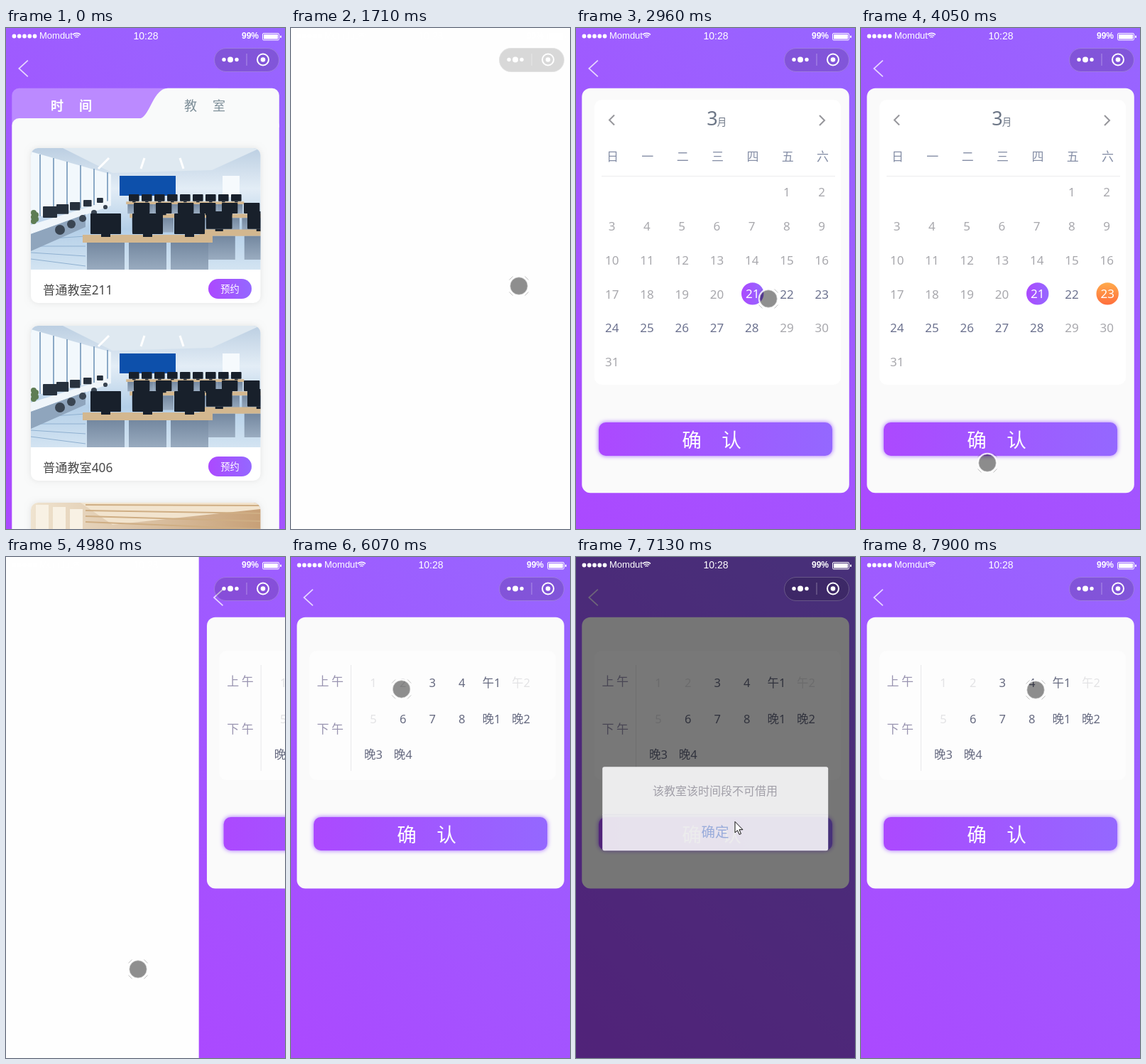
An HTML page with a canvas that plays this animation: 393x705 px, repeating every 8000 ms.

```html
<!DOCTYPE html>
<html lang="zh">
<head>
<meta charset="utf-8">
<title>教室预约</title>
<style>
html, body { margin: 0; width: 100%; height: 100%; overflow: hidden; background: #fff; }
canvas { display: block; width: 393px; height: 705px; }
</style>
</head>
<body>
<canvas id="stage"></canvas>
<script>
const W = 393, H = 705, LOOP = 8000;
const SANS = '"Noto Sans", "Noto Sans CJK SC", "Noto Sans CJK", sans-serif';
const UI = '"Liberation Sans", sans-serif';

const canvas = document.getElementById('stage');
const dpr = window.devicePixelRatio || 1;
canvas.width = W * dpr;
canvas.height = H * dpr;
const g = canvas.getContext('2d');

const clamp = v => Math.max(0, Math.min(1, v));
const smooth = v => v * v * (3 - 2 * v);
const lerp = (a, b, p) => a + (b - a) * p;
const repeat = (n, draw) => { for (let i = 0; i < n; i++) draw(i); };

// ---------- drawing helpers ----------
function box(x, y, w, h, fill, r = 0) {
  g.fillStyle = fill;
  g.beginPath();
  g.roundRect(x, y, w, h, r);
  g.fill();
}

function outline(x, y, w, h, r, color) {
  g.strokeStyle = color;
  g.lineWidth = 1;
  g.beginPath();
  g.roundRect(x, y, w, h, r);
  g.stroke();
}

function disc(x, y, r, fill) {
  g.fillStyle = fill;
  g.beginPath();
  g.arc(x, y, r, 0, 7);
  g.fill();
}

function ring(x, y, r, width, color, from = 0, to = 7) {
  g.strokeStyle = color;
  g.lineWidth = width;
  g.beginPath();
  g.arc(x, y, r, from, to);
  g.stroke();
}

function trace(pts) {
  g.beginPath();
  for (let i = 0; i < pts.length; i += 2) g.lineTo(pts[i], pts[i + 1]);
}

function poly(fill, ...pts) {
  g.fillStyle = fill;
  trace(pts);
  g.closePath();
  g.fill();
}

function line(color, width, ...pts) {
  g.strokeStyle = color;
  g.lineWidth = width;
  trace(pts);
  g.stroke();
}

function chevron(x, y, w, h, width, color) {
  line(color, width, x + w, y - h, x, y, x + w, y + h);
}

function text(s, x, y, size, fill, { font = SANS, align = 'center', weight = 400 } = {}) {
  g.font = `${weight} ${size}px ${font}`;
  g.textAlign = align;
  g.fillStyle = fill;
  g.fillText(s, x, y + size * 0.37);
}

// Characters set one by one around evenly spaced centres.
function spread(s, x, gap, y, size, fill, weight) {
  [...s].forEach((c, i) => text(c, x + gap * i, y, size, fill, { weight }));
}

function grad(x0, y0, x1, y1, ...colors) {
  const f = g.createLinearGradient(x0, y0, x1, y1);
  colors.forEach((c, i) => f.addColorStop(i / (colors.length - 1), c));
  return f;
}

const violet = (x, w) => grad(x, 0, x + w, 0, '#ac49ff', '#9468ff');

function glowBox(x, y, w, h, fill, r, glow, blur) {
  g.save();
  g.shadowColor = glow;
  g.shadowBlur = blur * dpr;
  box(x, y, w, h, fill, r);
  g.restore();
}

// ---------- shared parts ----------
function backdrop() {
  g.fillStyle = grad(-78, 627, 471, 78, '#ab49ff', '#9766ff');
  g.fillRect(-3, 0, W + 3, H);
  chevron(18.3, 57, 12.5, 11.3, 1.7, 'rgba(255,255,255,.75)');
}

function sheet(h) {
  backdrop();
  box(8.3, 84.8, 376.5, h, '#fafafa', 12);
}

function confirmButton(y) {
  glowBox(32, y, 329, 47, violet(32, 329), 10, 'rgba(150,80,255,.9)', 6);
  spread('确认', 163, 56, y + 25, 27.5, '#fff', 500);
}

function statusBar() {
  repeat(5, i => disc(11.5 + 7.25 * i, 11.5, 2.9, '#fff'));
  text('Momdut', 47, 10.5, 13, '#fff', { font: UI, align: 'left' });
  repeat(3, i => ring(99.5, 15.5, 3 + 2.6 * i, 1.4, '#fff', -2.3, -0.84));
  text('10:28', 197, 11, 14, '#fff', { font: UI });
  text('99%', 332, 10.7, 12, '#fff', { font: UI, align: 'left', weight: 700 });
  outline(361.5, 7.5, 23, 9.5, 1.5, '#fff');
  box(363, 9, 20, 6.5, '#fff');
  box(386, 10.5, 2, 3.5, '#fff', 1);
}

function capsule() {
  box(293, 28, 92, 34, 'rgba(0,0,0,.15)', 17);
  outline(293.5, 28.5, 91, 33, 16.5, 'rgba(255,255,255,.22)');
  repeat(3, i => disc(307 + 9 * i, 44.5, i === 1 ? 4 : 2.7, '#fff'));
  line('rgba(255,255,255,.3)', 1.2, 339, 36, 339, 53);
  ring(362, 44.5, 8, 2, '#fff');
  disc(362, 44.5, 3.3, '#fff');
}

// ---------- classroom list ----------
// A row of n desks with screens, at scale s.
function deskRow(n, x, y, step, s) {
  const w = (n - 1) * step + 53 * s;
  box(x - 11 * s, y + 30 * s, w + 12 * s, 11 * s, '#d3b78f');
  repeat(n, i => {
    const left = x + i * step;
    box(left - 5 * s, y + 41 * s, 53 * s, 39 * s, grad(0, y + 41 * s, 0, y + 80 * s, '#7488a0', '#9aacc0'));
    box(left, y, 43 * s, 29 * s, '#18202b', 1);
    box(left + 15 * s, y + 29 * s, 13 * s, 4 * s, '#18202b');
  });
}

function labPhoto() {
  box(35, 169, 324, 171, grad(0, 169, 0, 340, '#bccfe2', '#e3edf6', '#b4cfe8', '#d3e4f2'));
  poly('#dfe9f1', 80, 169, 358, 169, 290, 200, 150, 204);
  repeat(3, i => line('#fff', 3, 130 + 60 * i, 198, 145 + 50 * i, 183));
  poly('#f2f8fc', 35, 174, 148, 206, 148, 244, 35, 268);
  repeat(6, i => line('#8ba9c6', 2, 48 + 19 * i, 178 + 5 * i, 48 + 19 * i, 265 - 4 * i));
  box(160, 208, 79, 28, '#0d50ab');
  box(305, 208, 24, 30, '#f6fafd');
  repeat(5, i => line('#8fb0d0', 1, 35, 325 - 9 * i, 112, 335 - 14 * i));
  poly('#eff5fa', 35, 277, 148, 242, 148, 250, 35, 290);
  poly('#8fa5bd', 35, 290, 112, 262, 112, 280, 35, 314);
  repeat(5, i => {
    const s = 1 - 0.14 * i;
    box(52 + 19 * i, 251 - 3 * i, 20 * s, 16 * s, '#27313d', 1);
    disc(76 + 16 * i, 284 - 8 * i, 7 * s, '#3a4552');
    disc(39 + 3 * (i % 2), 260 + 3 * i, 4, '#5e7d54');
  });
  deskRow(9, 173, 234, 18, 0.34);
  deskRow(6, 180, 246, 31, 0.52);
  deskRow(2, 282, 258, 58, 0.85);
  deskRow(3, 119, 261, 59, 1);
}

function hallPhoto() {
  box(35, 169, 324, 171, grad(35, 0, 358, 0, '#efe3cf', '#c7a077'));
  poly('#f2e4ce', 105, 169, 358, 169, 358, 178, 150, 200);
  repeat(4, i => line('#cfae84', 2, 112, 172 + 8 * i, 358, 173 + 11 * i));
  repeat(3, i => box(42 + 24 * i, 172 + 3 * i, 18, 40, '#f8f1e4'));
}

function card(y, name, photo) {
  g.save();
  g.translate(0, y - 169);
  glowBox(35, 169, 323.5, 218, '#fff', 10, 'rgba(0,0,0,.09)', 8);
  g.save();
  g.beginPath();
  g.roundRect(35, 169, 323.5, 171, [10, 10, 0, 0]);
  g.clip();
  photo();
  g.restore();
  text(name, 52, 369, 17.2, '#484848', { align: 'left' });
  box(285, 353, 61, 28, violet(285, 61), 14);
  text('预约', 315.5, 367, 13.2, '#fff');
  g.restore();
}

function listPage() {
  backdrop();
  box(8.3, 84.8, 300, 60, '#bb8aff', 10);
  box(8.3, 127, 376.5, H, '#f9fafa', 10);
  g.fillStyle = '#f9fafa';
  g.beginPath();
  g.moveTo(190, 127);
  g.bezierCurveTo(203, 122, 208, 84.8, 228, 84.8);
  g.arcTo(384.8, 84.8, 384.8, 100, 10);
  g.lineTo(384.8, 140);
  g.lineTo(190, 140);
  g.fill();
  spread('时间', 72, 40, 109.5, 18, '#fff', 700);
  spread('教室', 260, 40, 109.5, 18, '#7d8e98', 500);
  card(169, '普通教室211', labPhoto);
  card(419, '普通教室406', labPhoto);
  card(668, '普通教室512', hallPhoto);
}

// ---------- calendar ----------
function dayColor(d) {
  return d > 21 && d < 29 ? '#6d7390' : '#a8a8ad';
}

function calendarPage(picked) {
  sheet(569.5);
  box(26, 101, 347, 401, '#fff', 10);
  chevron(47, 129.5, 7, 7, 2, '#96969b');
  chevron(350, 130, -7, 7, 2, '#96969b');
  text('3', 192, 127.5, 27, '#6c7686');
  text('月', 205.5, 132, 13.5, '#6c7686');
  spread('日一二三四五六', 51.5, 49.35, 181, 17, '#858ea6', 300);
  line('#ececee', 1, 36, 208.5, 365, 208.5);
  repeat(31, i => {
    const d = i + 1, cell = i + 5;
    const x = 50.7 + 49.25 * (cell % 7), y = 231 + 47.8 * Math.floor(cell / 7);
    const fill = d === 21 ? violet(x - 15, 32)
      : d === 23 && picked ? grad(0, 358, 0, 390, '#ffab4c', '#ff6d3c') : null;
    if (fill) disc(x + 1, y - 0.5, 15.7, fill);
    text(d, fill ? x + 1 : x, fill ? y - 1 : y, 17, fill ? '#fff' : dayColor(d));
  });
  confirmButton(555);
}

// ---------- period picker ----------
const PERIODS = '1 2 3 4 午1 午2 5 6 7 8 晚1 晚2 晚3 晚4'.split(' ');
const TAKEN = ['1', '2', '5', '午2'];

function periodPage() {
  sheet(381.7);
  box(26, 132, 347, 182, '#fdfdfd', 10);
  spread('上午', 45, 20.5, 175, 17, '#9a95b1', 300);
  spread('下午', 45, 20.5, 242, 17, '#9a95b1', 300);
  line('#e8e8ea', 1, 84.5, 152, 84.5, 301);
  PERIODS.forEach((s, i) =>
    text(s, 116 + 41.6 * (i % 6), 177 + 50.4 * Math.floor(i / 6), 16.5, TAKEN.includes(s) ? '#e3e3e5' : '#666a80'));
  confirmButton(366);
}

function modal(alpha) {
  g.save();
  g.globalAlpha = alpha;
  g.fillStyle = 'rgba(0,0,0,.6)';
  g.fillRect(0, 0, W, H);
  box(37.2, 295.3, 318, 118, '#fdfdfe', 3);
  text('该教室该时间段不可借用', 196, 329.5, 16, '#96939e');
  line('#e4e4e8', 1, 37, 362.5, 355, 362.5);
  text('确定', 196, 387, 19.5, '#8ea3d8');
  g.restore();
}

// ---------- pointer ----------
// Each move: start time, end time, destination.
const ENTRY = [206, 535];
const MOVES = [
  [470, 624, 234, 278],
  [779, 1319, 321, 363],
  [2246, 2940, 271, 381],
  [2940, 3558, 346, 383],
  [3635, 4021, 178, 612],
  [4021, 4253, 186, 580],
  [5179, 6106, 155, 178],
  [6183, 6724, 224, 395],
  [7030, 7418, 219, 181],
  [7572, 7881, 246, 187]
];

function pointerAt(t) {
  let [x, y] = ENTRY;
  for (const [from, to, tx, ty] of MOVES) {
    const p = smooth(clamp((t - from) / (to - from)));
    x = lerp(x, tx, p);
    y = lerp(y, ty, p);
  }
  return [x, y];
}

function touchDot() {
  ring(0, 0, 13.2, 2, 'rgba(255,255,255,.85)');
  disc(0, 0, 12.2, 'rgba(0,0,0,.44)');
  ring(0, 0, 12.2, 1, 'rgba(205,205,205,.7)');
  repeat(4, () => {
    g.rotate(Math.PI / 2);
    line('rgba(110,110,110,.6)', 0.7, 8.5, 13.5, 13.5, 8.5);
  });
}

function arrow() {
  poly('#fff', 0.5, 0.5, 0.5, 16, 4, 12.8, 6.6, 18.6, 9, 17.5, 6.5, 11.8, 11.5, 11.8);
  g.strokeStyle = '#111';
  g.lineWidth = 1;
  g.stroke();
}

function pointer(t) {
  if (t < MOVES[0][0]) return;
  g.save();
  g.translate(...pointerAt(t));
  if (t > 6300 && t < 7200) arrow();
  else touchDot();
  g.restore();
}

// ---------- timeline ----------
const STEP = 77.2, START = 470;
const tick = t => t < START ? t : START + Math.floor((t - START) / STEP) * STEP;

function slideIn(t, from, page) {
  const p = clamp((t - from) / 245);
  if (!p) return;
  g.save();
  g.translate(W * (1 + Math.cos(Math.PI * p)) / 2, 0);
  page();
  g.restore();
}

function render(ms) {
  const t = tick(ms);
  g.setTransform(dpr, 0, 0, dpr, 0, 0);
  g.fillStyle = '#fefefe';
  g.fillRect(0, 0, W, H);
  if (t < 1700) listPage();
  else if (t < 4700) slideIn(t, 1923, () => calendarPage(t > 3700));
  else slideIn(t, 4857, periodPage);
  const veil = clamp((t - 6220) / 200) * clamp((7310 - t) / 230);
  if (veil) modal(veil);
  statusBar();
  capsule();
  pointer(t);
}

const origin = performance.now();
function loop() {
  render((performance.now() - origin) % LOOP);
  requestAnimationFrame(loop);
}
loop();
</script>
</body>
</html>
```
